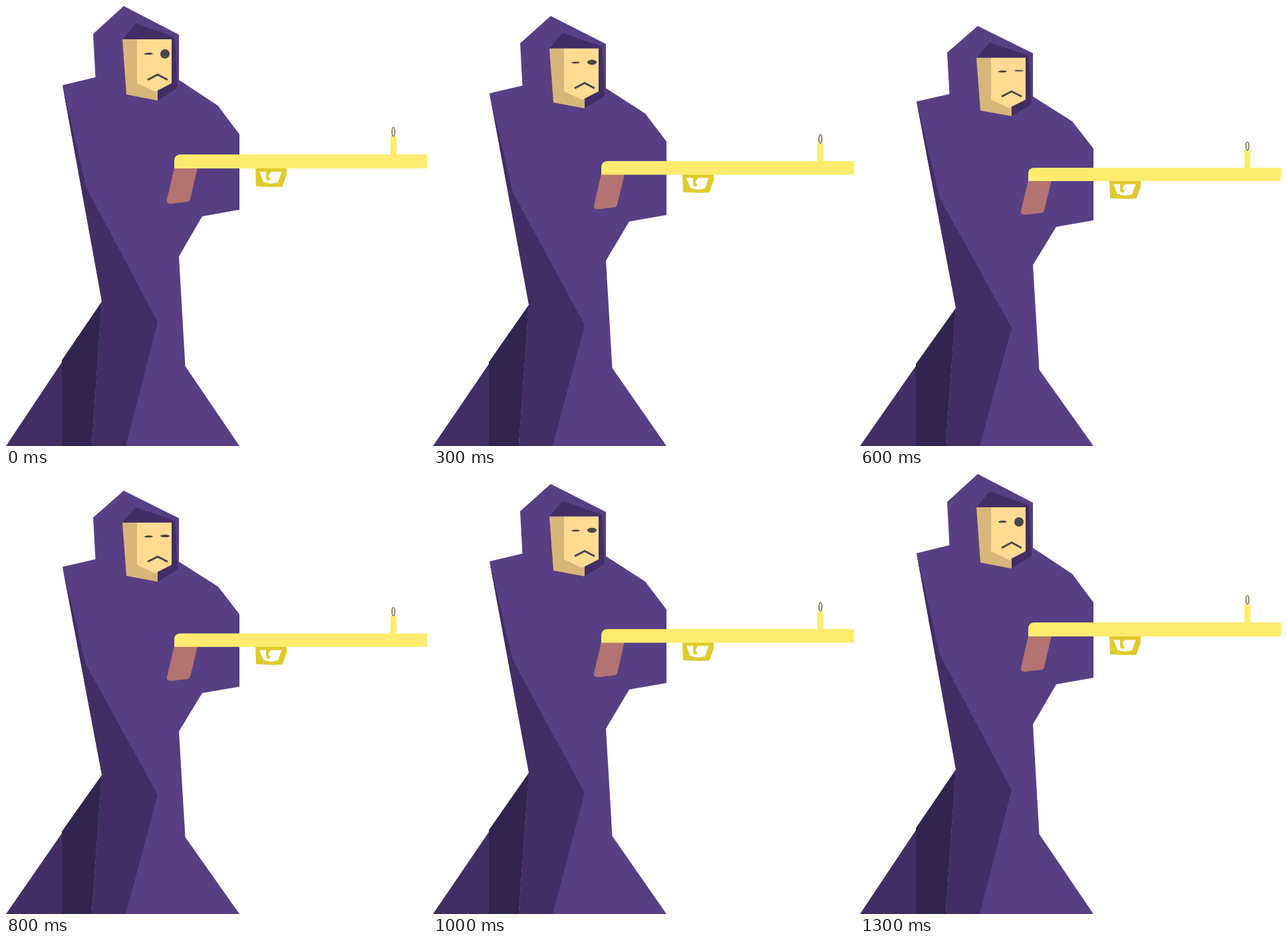
Animation of 633x661 px, one loop 1400 ms. Source, as an HTML page:

```html
<!DOCTYPE html>
<html lang="en">
<head>
<meta charset="utf-8">
<title>Breathing hooded figure</title>
<style>
  html, body { margin: 0; width: 100%; height: 100%; overflow: hidden; background: #fff; }
  svg { display: block; width: 633px; height: 661px; }
  .robe { fill: #583f84; }
  .shade { fill: #422e65; }
  .deep { fill: #31244f; }
  .ink { fill: #47474a; }
  .gold { fill: #ffec6e; }
</style>
</head>
<body>
<svg viewBox="0 0 633 661">
  <g id="figure">
    <!-- robe -->
    <path class="robe" d="M177 0L260 43V111L319 150L351 193V306L295 316L260 376L269.5 541L351 661H129L144 443L85 119L134.5 107L131 42Z"/>
    <path class="shade" d="M85 119L120 271L228 475L180 661H129L144 443Z"/>
    <path class="shade" d="M0 661L84 535H85V661Z"/>
    <path class="deep" d="M144 444L84 532V661H129Z"/>

    <!-- hood and face -->
    <path class="shade" d="M195 26L254 47L258 123L228 142V120L175 50Z"/>
    <path fill="#d6b679" d="M175 50H200V116L228 126V142L181 133Z"/>
    <path fill="#ffda91" d="M197 50H249V116L224 129L197 116Z"/>
    <path class="ink" d="M207 71.7Q214 68.6 221 71.2Q220 73.2 214 73.2Q209 73.2 207 71.7Z"/>
    <ellipse class="ink" id="eye" cx="239" cy="72" rx="7" ry="7"/>
    <path d="M213 111L228 103L243 111" fill="none" stroke="#47474a" stroke-width="3"/>

    <!-- long golden barrel -->
    <path fill="#b37370" d="M253 243H288L277 290Q276 294 272 294.3L248 297Q241 297 242 291Z"/>
    <path fill="#dfca2c" fill-rule="evenodd" d="M375 243H422V253L415.5 271.5L400 272L376 271ZM381 249L387 264.5L398 267L409 265L414.500 249Z"/>
    <path fill="#dfca2c" d="M391 248H399.500Q395 253 394.500 256L397.500 259.500Q397 263 393 262Q391 261 391 258Z"/>
    <path class="gold" d="M253 244V233Q253 223 263 223H578V196H587V223H633V244Z"/>
    <ellipse cx="582.5" cy="189" rx="2.2" ry="6.5" fill="#fff" stroke="#5e4b20" stroke-width="1.2"/>
  </g>
</svg>
<script>
  const LOOP = 1400, STEP = 100, DEPTH = 6, FLOOR = 661;
  const figure = document.getElementById('figure');
  const eye = document.getElementById('eye');
  const start = performance.now();

  // Sink in six steps, rest, then rise again.
  function levelAt(time) {
    const step = Math.floor(time / STEP);
    return Math.min(step, DEPTH, 13 - step);
  }

  function draw(now) {
    const level = levelAt(Math.max(0, now - start) % LOOP);
    const drop = level * 5;
    figure.setAttribute('transform', `translate(0 ${drop}) scale(1 ${(FLOOR - drop) / FLOOR})`);
    eye.setAttribute('cy', 72 - level * 0.26);
    eye.setAttribute('ry', 7 - level);
    requestAnimationFrame(draw);
  }
  draw(start);
</script>
</body>
</html>
```
